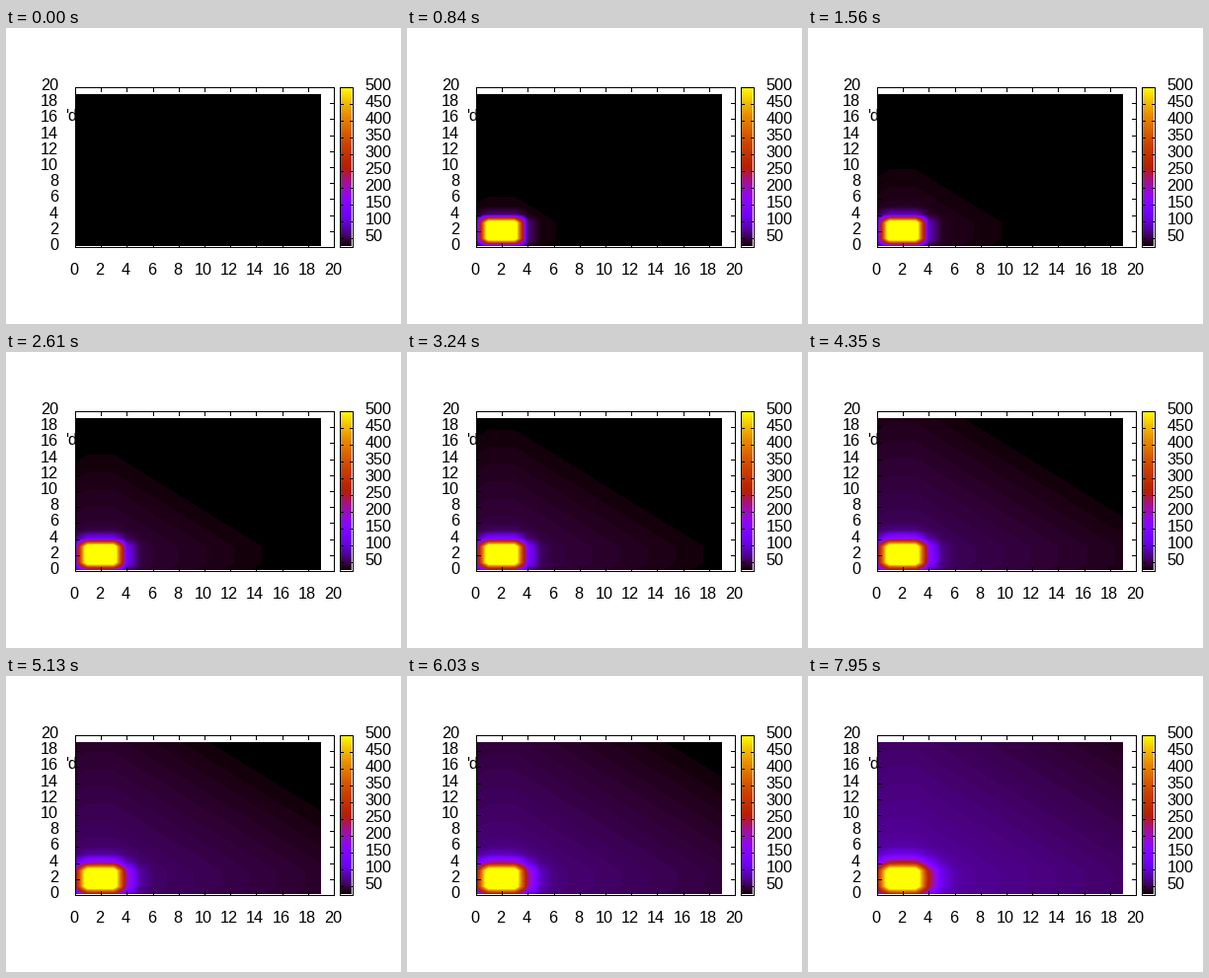
Write a matplotlib script that moves like this. It is 400 px wide and 300 px high and loops after 8 s.

```python
import numpy as np
import matplotlib.pyplot as plt
from matplotlib.animation import FuncAnimation
from matplotlib.collections import LineCollection

W, H = 400, 300
LEFT, RIGHT, TOP, BOTTOM = 69.5, 331.5, 59.5, 221.5   # plot frame
BAR_L, BAR_R = 337.5, 350.5                           # colour bar
UX, UY = (RIGHT - LEFT) / 20, (BOTTOM - TOP) / 20
COLD, HOT, SOURCE = 25, 500, 600
LEVELS = 157
N = 20
STEP_MS, TICK_MS, LOOP_MS = 30, 20, 8000
LAST = 265
RATE = 0.0021          # diffusion per step
SPEED = 0.1423         # cells per step of the outer front
SLOPE = 1.4            # degrees per cell behind the front

plt.rcParams["font.family"] = "Liberation Sans"


def make_palette():
    g = np.arange(LEVELS) / (LEVELS - 1)
    rgb = np.stack([np.sqrt(g), g ** 3, np.sin(2 * np.pi * g)], axis=1)
    return np.round(np.clip(rgb, 0, 1) * 255).astype(np.uint8)


PALETTE = make_palette()


def colour(temp):
    level = np.floor((temp - COLD) / (HOT - COLD) * LEVELS + 1e-9)
    return PALETTE[np.clip(level, 0, LEVELS - 1).astype(int)]


def simulate():
    """Temperatures on the grid for every step."""
    n = np.arange(N)
    off = np.maximum(np.maximum(1 - n, n - 3), 0)
    dist = off[:, None] + off[None, :]
    plate = dist == 0
    band = (HOT - COLD) / LEVELS
    heat = np.where(plate, SOURCE - COLD, 0.0)
    grids = [np.full((N, N), float(COLD))]
    for k in range(1, LAST + 1):
        p = np.pad(heat, 1)
        lap = p[2:, 1:-1] + p[:-2, 1:-1] + p[1:-1, 2:] + p[1:-1, :-2] - 4 * heat
        heat = np.where(plate, SOURCE - COLD, heat + RATE * lap)
        front = np.maximum(0, band + SLOPE * (k * SPEED - 0.74 - dist))
        grids.append(COLD + heat + np.where(plate, 0, front))
    return grids


def weights(pos):
    """Linear interpolation matrix from grid nodes to positions."""
    return np.maximum(0, 1 - np.abs(pos[:, None] - np.arange(N)[None, :]))


GRIDS = simulate()
px = np.arange(70, 319) + 0.5
py = np.arange(67, 221) + 0.5
WX = weights(np.clip((px - LEFT) / UX, 0, N - 1))
WY = weights(np.clip((BOTTOM - py) / UY, 0, N - 1))


def heat_map(k):
    return colour(WY @ GRIDS[k] @ WX.T)


fig = plt.figure(figsize=(W / 100, H / 100), dpi=100, facecolor="white")
ax = fig.add_axes([0, 0, 1, 1])


def label(x, y, text, ha):
    ax.text(x, y, text, ha=ha, va="baseline", fontsize=11.66, color="black", zorder=1)


def box(x0, x1, y0, y1):
    return [[(x0, y0), (x1, y0)], [(x0, y1), (x1, y1)],
            [(x0, y0), (x0, y1)], [(x1, y0), (x1, y1)]]


def centre(v):
    return np.floor(v) + 0.5


label(60.5, 94, "'d", "left")

image = ax.imshow(heat_map(0), extent=(70, 319, 221, 67),
                  interpolation="nearest", zorder=2)
bar_temp = HOT - (np.arange(60, 221) + 0.5 - TOP) / (BOTTOM - TOP) * (HOT - COLD)
ax.imshow(np.repeat(colour(bar_temp)[:, None], 12, axis=1),
          extent=(338, 350, 221, 60), interpolation="nearest", zorder=2)

lines = box(LEFT, RIGHT, TOP, BOTTOM) + box(BAR_L, BAR_R, TOP, BOTTOM)
for v in range(0, 21, 2):
    x, y = centre(LEFT + v * UX), centre(BOTTOM - v * UY)
    lines += [[(x, TOP), (x, TOP + 4)], [(x, BOTTOM), (x, BOTTOM - 4)],
              [(LEFT, y), (LEFT + 4, y)], [(RIGHT, y), (RIGHT - 4, y)]]
    label(x - 0.5, 250, str(v), "center")
    label(53, y + 3.5, str(v), "right")
for v in range(50, 501, 50):
    y = centre(BOTTOM - (v - COLD) / (HOT - COLD) * (BOTTOM - TOP))
    lines += [[(BAR_L, y), (BAR_L + 3, y)], [(BAR_R, y), (BAR_R - 3, y)]]
    label(363.5, y + 3.5, str(v), "left")
ax.add_collection(LineCollection(lines, colors="black", linewidths=0.72,
                                 capstyle="projecting", zorder=3))

ax.set_aspect("auto")
ax.set_xlim(0, W)
ax.set_ylim(H, 0)
ax.axis("off")


def update(i):
    image.set_data(heat_map(min(i * TICK_MS // STEP_MS, LAST)))
    return [image]


anim = FuncAnimation(fig, update, frames=LOOP_MS // TICK_MS, interval=TICK_MS,
                     init_func=lambda: update(0), repeat=True, repeat_delay=0,
                     blit=False)
plt.show()
```
